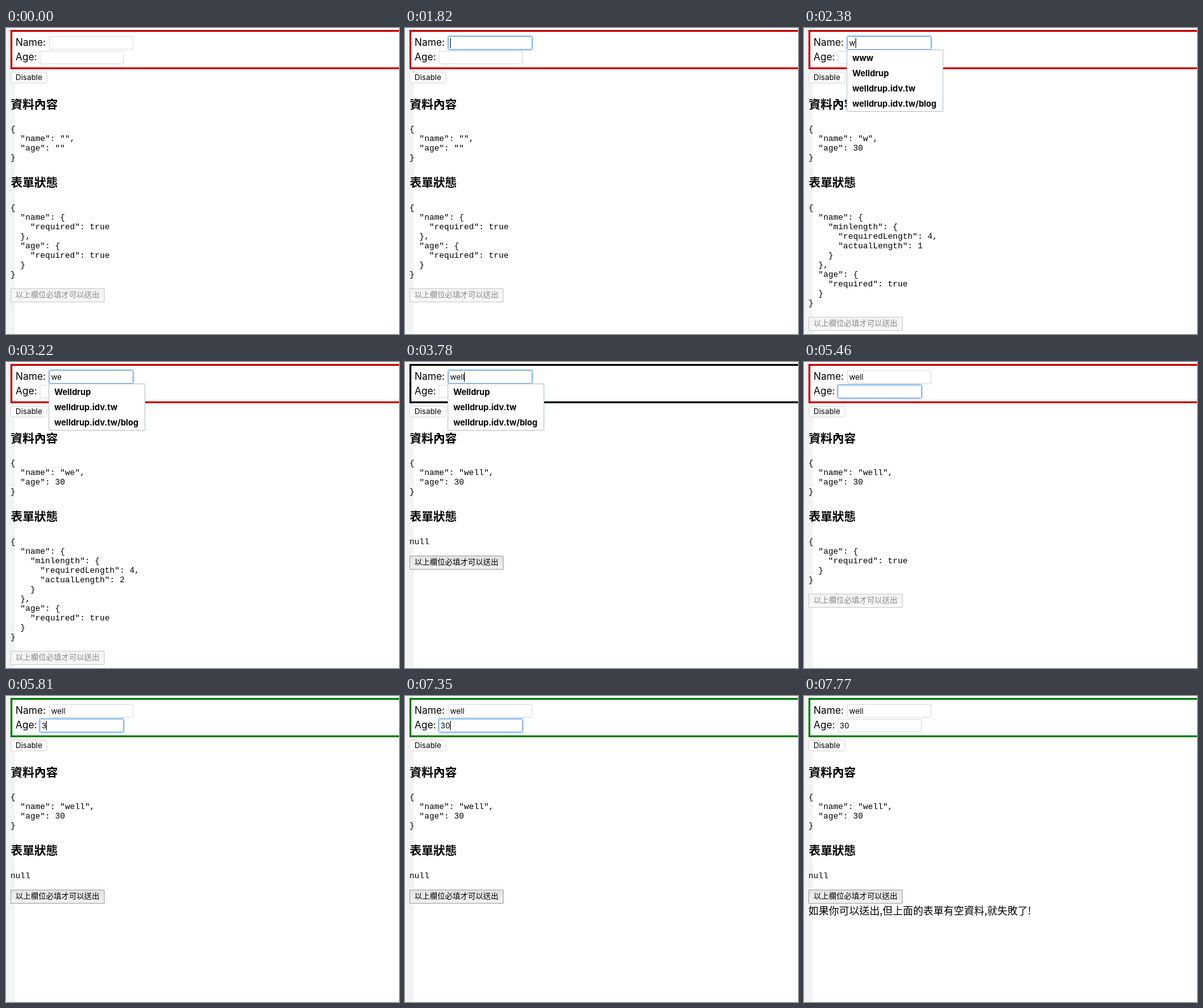
Recreate the animation shown at these times as an HTML page with a canvas. Size 618 by 482 pixels, loop 8000 ms.

```html
<!DOCTYPE html>
<html lang="zh-Hant">
<head>
<meta charset="utf-8">
<title>Form validation</title>
<style>
  html, body { margin: 0; width: 100%; height: 100%; overflow: hidden; background: #fff; }
  canvas { display: block; }
</style>
</head>
<body>
<canvas id="stage" width="618" height="482"></canvas>
<script>
const ctx = document.getElementById('stage').getContext('2d');
const LOOP = 8000;
const SANS = 'Inter, "Liberation Sans", sans-serif';
const MONO = '"Liberation Mono", monospace';
const CJK = '"Noto Sans CJK TC", "Noto Sans CJK", sans-serif';
const RED = '#c60000', GREEN = '#008000', BLACK = '#000';

const required = { required: true };
const tooShort = n => ({
  name: { minlength: { requiredLength: 4, actualLength: n } },
  age: required
});
const SITES = ['Welldrup', 'welldrup.idv.tw', 'welldrup.idv.tw/blog'];

const initial = {
  name: '', age: '', focus: null, caret: true, options: [],
  data: { name: '', age: '' },
  errors: { name: required, age: required },
  border: RED, pressed: false, message: false
};

const typedName = (name, more) => ({ name, caret: true, data: { name, age: 30 }, ...more });

// Each entry changes part of the state from its time on.
const timeline = [
  [1820, { focus: 'name' }],
  [2310, typedName('w', { errors: tooShort(1) })],
  [2380, { options: ['www', ...SITES] }],
  [2660, typedName('we', { errors: tooShort(2), options: SITES })],
  [3150, { caret: false }],
  [3430, typedName('wel', { errors: tooShort(3) })],
  [3780, typedName('well', { errors: null, border: BLACK })],
  [3850, { errors: { age: required }, border: RED }],
  [4340, { caret: false }],
  [4830, { caret: true }],
  [4900, { focus: 'age', options: [] }],
  [5460, { caret: false }],
  [5810, { age: '3', caret: true, errors: null, border: GREEN }],
  [6300, { age: '30' }],
  [6860, { caret: false }],
  [7350, { caret: true }],
  [7630, { focus: null, pressed: true }],
  [7770, { pressed: false, message: true }]
];

function stateAt(time) {
  const state = { ...initial };
  for (const [start, change] of timeline) {
    if (time >= start) Object.assign(state, change);
  }
  return state;
}

function text(str, x, y, font, color = '#000') {
  ctx.font = font;
  ctx.fillStyle = color;
  ctx.fillText(str, x, y);
}

function fill(x, y, w, h, color) {
  ctx.fillStyle = color;
  ctx.fillRect(x, y, w, h);
}

function outline(x, y, w, h, color, radius = 0, background) {
  ctx.beginPath();
  ctx.roundRect(x + 0.5, y + 0.5, w - 1, h - 1, radius);
  if (background) {
    ctx.fillStyle = background;
    ctx.fill();
  }
  ctx.lineWidth = 1;
  ctx.strokeStyle = color;
  ctx.stroke();
}

function drawInput(x, y, value, focused, caret) {
  if (focused) {
    outline(x - 2, y - 2, 136, 25, '#d3e6fa', 3);
    outline(x - 1, y - 1, 134, 23, '#9cc8f4', 2);
    outline(x, y, 132, 21, '#80b3ea', 1, '#fff');
  } else {
    outline(x, y, 132, 21, '#dcdcdc', 0, '#fff');
  }
  text(value, x + 3, y + 14.5, `12px ${SANS}`);
  if (focused && caret) {
    fill(Math.round(x + 3 + ctx.measureText(value).width), y + 3, 1, 15, '#000');
  }
}

// Returns the y of the middle of the last line.
function drawJson(value, y) {
  const lines = JSON.stringify(value, null, 2).split('\n');
  lines.forEach((line, i) => text(line, 7, y + 4 + i * 15, `13px ${MONO}`));
  return y + (lines.length - 1) * 15;
}

function drawSubmit(y, enabled, pressed) {
  const shade = ctx.createLinearGradient(0, y, 0, y + 22);
  const colors = pressed ? ['#c4c4c4', '#d2d2d2']
    : enabled ? ['#e2e2e2', '#f3f3f3'] : ['#f2f2f2', '#f8f8f8'];
  colors.forEach((color, i) => shade.addColorStop(i, color));
  outline(7, y, 148, 22, enabled ? '#a2a2a2' : '#cbcbcb', 0, shade);
  text('以上欄位必填才可以送出', 15, y + 15, `12px ${CJK}`, enabled ? '#000' : '#8b8b8b');
}

function drawOptions(options) {
  if (!options.length) return;
  outline(67, 34, 152, options.length * 24 + 2, '#b4c1cb', 0, '#fff');
  options.forEach((option, i) => text(option, 76, 52 + i * 24, `bold 13px ${SANS}`));
}

function draw(state) {
  fill(0, 0, 618, 482, '#fff');
  fill(0, 0, 14, 482, '#f3f3f3');

  fill(7, 3, 620, 62, state.border);
  fill(10, 6, 620, 56, '#fff');
  text('Name:', 15, 28, `15.5px ${SANS}`);
  text('Age:', 15, 51, `15.5px ${SANS}`);
  drawInput(68, 13, state.name, state.focus === 'name', state.caret);
  drawInput(53, 36, state.age, state.focus === 'age', state.caret);

  outline(7, 69, 58, 18, '#d5d5d5', 4, '#fff');
  text('Disable', 15, 82, `12px ${SANS}`);

  text('資料內容', 7.5, 127, `bold 18.5px ${CJK}`);
  drawJson(state.data, 159);
  text('表單狀態', 7.5, 250, `bold 18.5px ${CJK}`);
  const bottom = drawJson(state.errors, 283);

  drawSubmit(bottom + 22, !state.errors, state.pressed);
  if (state.message) {
    text('如果你可以送出,但上面的表單有空資料,就失敗了!'.replace(/,/g, ',').replace('!', '!'),
      7, 344, `16px ${CJK}`);
  }
  drawOptions(state.options);
}

const origin = performance.now();
function tick() {
  draw(stateAt((performance.now() - origin) % LOOP));
  requestAnimationFrame(tick);
}
tick();
</script>
</body>
</html>
```
